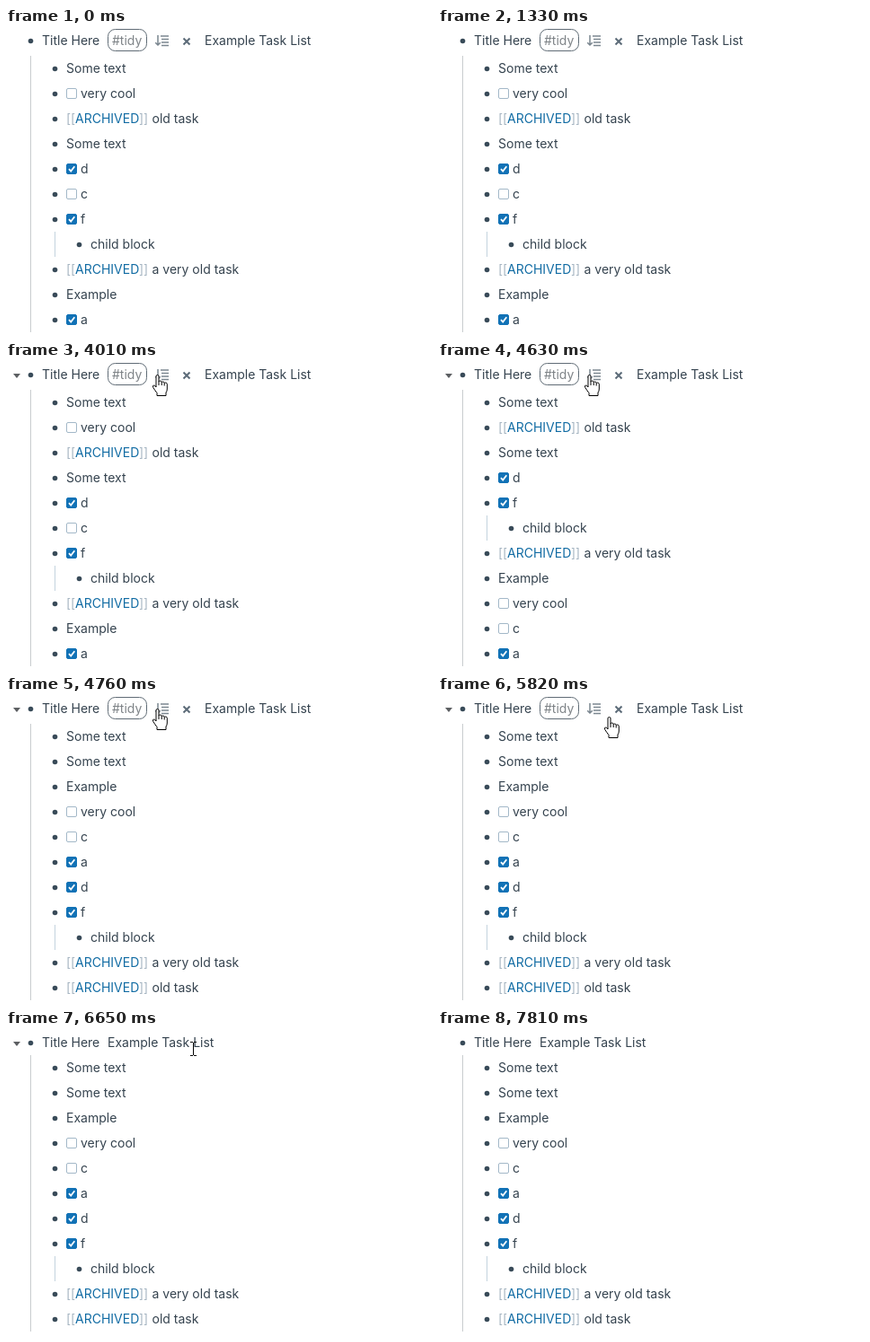
An HTML page that plays this animation: 474x341 px, repeating every 8270 ms.

```html
<!DOCTYPE html>
<html lang="en">
<head>
<meta charset="utf-8">
<title>Task list tidy</title>
<style>
  html, body { margin: 0; width: 100%; height: 100%; overflow: hidden; background: #fff; }
  svg { display: block; }
  text { font: 14px Inter, "Open Sans", sans-serif; fill: #35434f; white-space: pre; }
  .bullet { fill: #394b59; }
  .link { fill: #106ba3; }
  .bracket { fill: #a7b6c2; }
  .box { fill: #fff; stroke: #a3b8c8; }
  .checked { fill: #1272b6; stroke: #1272b6; }
  .tick { fill: none; stroke: #fff; stroke-width: 1.8; }
  .guide { fill: #c9cccf; }
  .subguide { fill: #c3d3de; }
  .pill { fill: #fff; stroke: #5f6b75; }
  .tag { fill: #7f8488; }
  .sort { fill: none; stroke: #7b8790; stroke-width: 1.5; }
  .close { fill: none; stroke: #5c6b78; stroke-width: 2; }
  .hand { fill: #fff; stroke: #000; stroke-linejoin: round; }
</style>
</head>
<body>
<svg width="474" height="341" viewBox="0 0 474 341">
  <path id="caret" d="M8 13H16L12 18Z" fill="#5c5f62"/>
  <circle class="bullet" cx="27.5" cy="14.5" r="2.8"/>
  <text x="40" y="19">Title Here</text>
  <g id="tools">
    <rect class="pill" x="113.5" y="1.5" width="43" height="24" rx="8"/>
    <text class="tag" x="118" y="19">#tidy</text>
    <path class="sort" d="M169 8V19M166.2 16.2L169 19L171.8 16.2M172 9H181M173 12.5H181M173 16H181M173 19.5H181"/>
    <path class="close" d="M197.5 11.5L204.5 18.5M204.5 11.5L197.5 18.5"/>
  </g>
  <text id="label" x="221" y="19">Example Task List</text>
  <g id="list">
    <rect class="guide" x="27" y="31" width="1" height="308"/>
  </g>
  <path id="ibeam" d="M0 0h3v1h1v-1h3v1h-3v14h3v1h-3v-1h-1v1h-3v-1h3v-14h-3z" shape-rendering="crispEdges"/>
  <g id="hand">
    <path class="hand" d="M-2 2Q-2 .5 -.5 .5T1 2V8Q1 7 2.6 7T4.2 8.6Q4.2 8 5.7 8T7.2 9.6Q7.2 9 8.7 9T10.3 10.8V16Q10.3 18.5 9 20V23.5H-1V20.5Q-3 18 -5.2 14.5Q-6.2 12.5 -4.8 12T-2 14Z"/>
    <path d="M1 8V12M4.2 8.6V12M7.2 9.6V12.5" stroke="#000"/>
  </g>
</svg>
<script>
const LOOP = 8270, PITCH = 28;
const $ = id => document.getElementById(id);

const bullet = x => `<circle class="bullet" cx="${x}" cy=".5" r="2.8"/>`;
const text = (x, s, cls = '') => `<text class="${cls}" x="${x}" y="5">${s}</text>`;
const plain = s => bullet(54.5) + text(67, s);
const task = (s, done) => bullet(54.5) +
  `<rect class="box ${done ? 'checked' : ''}" x="67.5" y="-5.5" width="11" height="11" rx="1.5"/>` +
  (done ? '<path class="tick" d="M70 .2L72.2 2.6L76.3 -2.8"/>' : '') + text(83, s);
const archived = s => bullet(54.5) + text(67, '[[', 'bracket') +
  text(77, 'ARCHIVED', 'link') + text(148, ']]', 'bracket') + text(162.5, s);
const child = s => `<g transform="translate(0 ${PITCH})">` +
  `<rect class="subguide" x="54" y="-14" width="1" height="28"/>${bullet(81.5)}${text(94, s)}</g>`;

const blocks = {
  first: plain('Some text'),
  cool: task('very cool'),
  old: archived('old task'),
  second: plain('Some text'),
  d: task('d', true),
  c: task('c'),
  f: task('f', true) + child('child block'),
  older: archived('a very old task'),
  example: plain('Example'),
  a: task('a', true)
};
const rows = {};
for (const key in blocks) {
  rows[key] = document.createElementNS('http://www.w3.org/2000/svg', 'g');
  rows[key].innerHTML = blocks[key];
  $('list').append(rows[key]);
}

// Tidying sends these blocks to the end, one after another.
const queue = ['cool', 'c', 'a', 'd', 'f', 'older', 'old'];
const movedCount = t => t < 4490 ? 0 : t < 4560 ? 1 : t < 4630 ? 2 : t < 4760 ? 3 : 7;

function layout(count) {
  const moved = queue.slice(0, count);
  const order = Object.keys(blocks).filter(k => !moved.includes(k)).concat(moved);
  let y = 45;
  for (const key of order) {
    rows[key].setAttribute('transform', `translate(0 ${y})`);
    y += key === 'f' ? 2 * PITCH : PITCH;
  }
}

const mix = (a, b, u) => a + (b - a) * u;
const curve = (a, b, c, u) => mix(mix(a, b, u), mix(b, c, u), u);
const easeOut = (u, p) => 1 - (1 - u) ** p;
// Progress in whole steps, as a screen recorder samples the pointer.
const stepped = (t, from, step, count) =>
  Math.min(1, Math.max(0, Math.floor((t - from) / step) / count));

function pointer(t) {
  if (t >= 990 && t < 1060) return [473, 324];
  if (t >= 1260 && t < 1330) return [474, 197];
  if (t < 3340 || t >= 7810) return null;
  if (t < 5820) {
    const u = easeOut(stepped(t, 3340, 67, 10), 1.6);
    return [curve(457, 250, 169, u), curve(186, -20, 14, u)];
  }
  if (t < 6980) {
    const u = easeOut(stepped(t, 5820, 80, 6), 1.6);
    return [mix(191, 208, u), mix(23, 21, u)];
  }
  const u = stepped(t, 6910, 70, 12) ** 1.5;
  return [mix(208, 387, u), mix(21, 328, u)];
}

const show = (id, on) => $(id).setAttribute('visibility', on ? 'visible' : 'hidden');
const place = (id, x, y) =>
  $(id).setAttribute('transform', `translate(${Math.round(x)} ${Math.round(y)})`);

function draw(t) {
  const closed = t >= 6580;
  show('tools', !closed);
  $('label').setAttribute('x', closed ? 113 : 221);
  place('list', 0, closed ? -3 : 0);
  layout(movedCount(t));

  const p = pointer(t);
  const onButton = !!p && t < 6650 && p[1] < 27 && p[0] > 160 && p[0] < 212;
  show('caret', p && p[1] < 28);
  show('hand', onButton);
  show('ibeam', p && !onButton);
  if (p) {
    place('hand', p[0], p[1]);
    place('ibeam', p[0] - 3, p[1] - 8);
  }
}

const start = performance.now();
function tick() {
  draw((performance.now() - start) % LOOP);
  requestAnimationFrame(tick);
}
tick();
</script>
</body>
</html>
```
